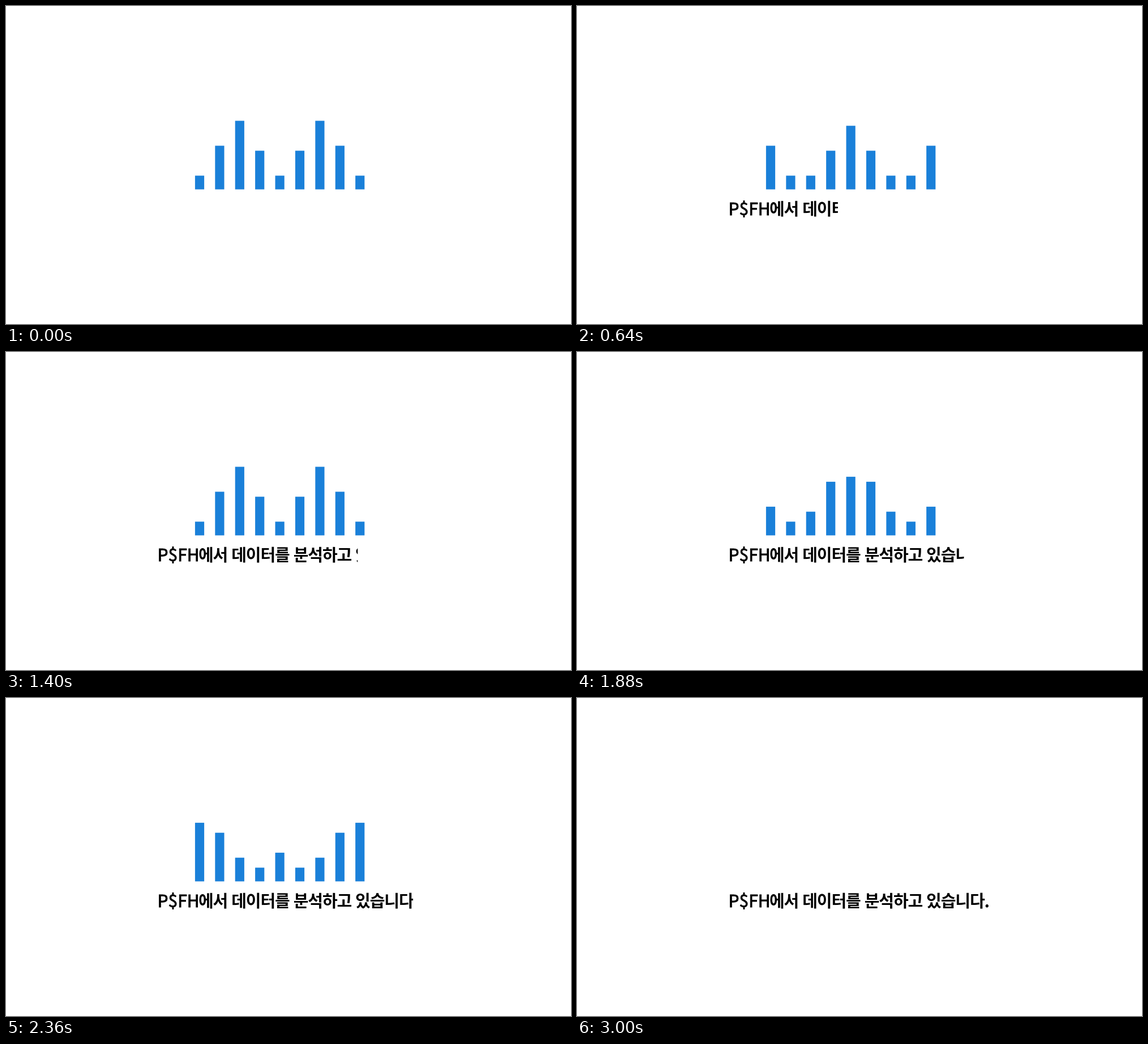
An HTML page that plays this animation: 998x561 px, repeating every 3040 ms.

```html
<!DOCTYPE html>
<html lang="ko">
<head>
<meta charset="utf-8">
<title>Loading</title>
<style>
  html, body { margin: 0; width: 100%; height: 100%; overflow: hidden; background: #fff; }
  svg { display: block; width: 998px; height: 561px; }
  text { font-family: "Noto Sans CJK KR", "Noto Sans CJK", "Noto Sans CJK JP", sans-serif; fill: #000; }
  .name { font-size: 30px; stroke: #000; stroke-width: .9px; }
  .line { font-size: 29px; font-weight: 700; letter-spacing: -1.08px; }
</style>
</head>
<body>
<svg viewBox="0 0 998 561">
  <defs>
    <clipPath id="wipe"><rect id="mask" x="260.5" y="330" width="0" height="60"/></clipPath>
  </defs>
  <g id="bars" fill="#1a80d9"></g>
  <g clip-path="url(#wipe)">
    <text class="name" x="267.6" y="368.7">P$FH</text>
    <text class="line" x="340" y="368.6">에서 데이터를 분석하고 있습니다.</text>
  </g>
</svg>
<script>
  const LOOP = 3040, FRAME = 40, TICK = 50;
  const FLOOR = 323.5, BASE = 24.2, STEP = 8.8, TOP = 11;
  const PEAKS = [0, 6, 11, 17, 22], CYCLE = 28;   // in ticks, outer bar to centre
  const WIPE = 473, TEXT_START = 80, BARS_END = 3000;

  const group = document.getElementById('bars');
  const mask = document.getElementById('mask');

  const bars = Array.from({ length: 9 }, (_, i) => {
    const bar = document.createElementNS('http://www.w3.org/2000/svg', 'rect');
    bar.setAttribute('x', 333.9 + 35.4 * i);
    bar.setAttribute('width', 16.2);
    return group.appendChild(bar);
  });

  // Triangle pulse around each peak, flat at zero between pulses
  function level(tick, peak) {
    const d = (tick - peak + CYCLE) % CYCLE;
    return Math.max(0, TOP - Math.min(d, CYCLE - d));
  }

  function draw(t) {
    const tick = (PEAKS[2] + Math.floor(t / TICK)) % CYCLE;
    bars.forEach((bar, i) => {
      const h = BASE + STEP * level(tick, PEAKS[4 - Math.abs(i - 4)]);
      bar.setAttribute('y', FLOOR - h);
      bar.setAttribute('height', h);
    });
    group.style.visibility = t < BARS_END ? 'visible' : 'hidden';

    const shown = t < TEXT_START ? 0 : 1 - Math.pow(1 - t / LOOP, 2.33);
    mask.setAttribute('width', WIPE * shown);
  }

  const start = performance.now();
  function loop() {
    const t = (performance.now() - start) % LOOP;
    draw(Math.floor(t / FRAME) * FRAME);
    requestAnimationFrame(loop);
  }
  draw(0);
  requestAnimationFrame(loop);
</script>
</body>
</html>
```
